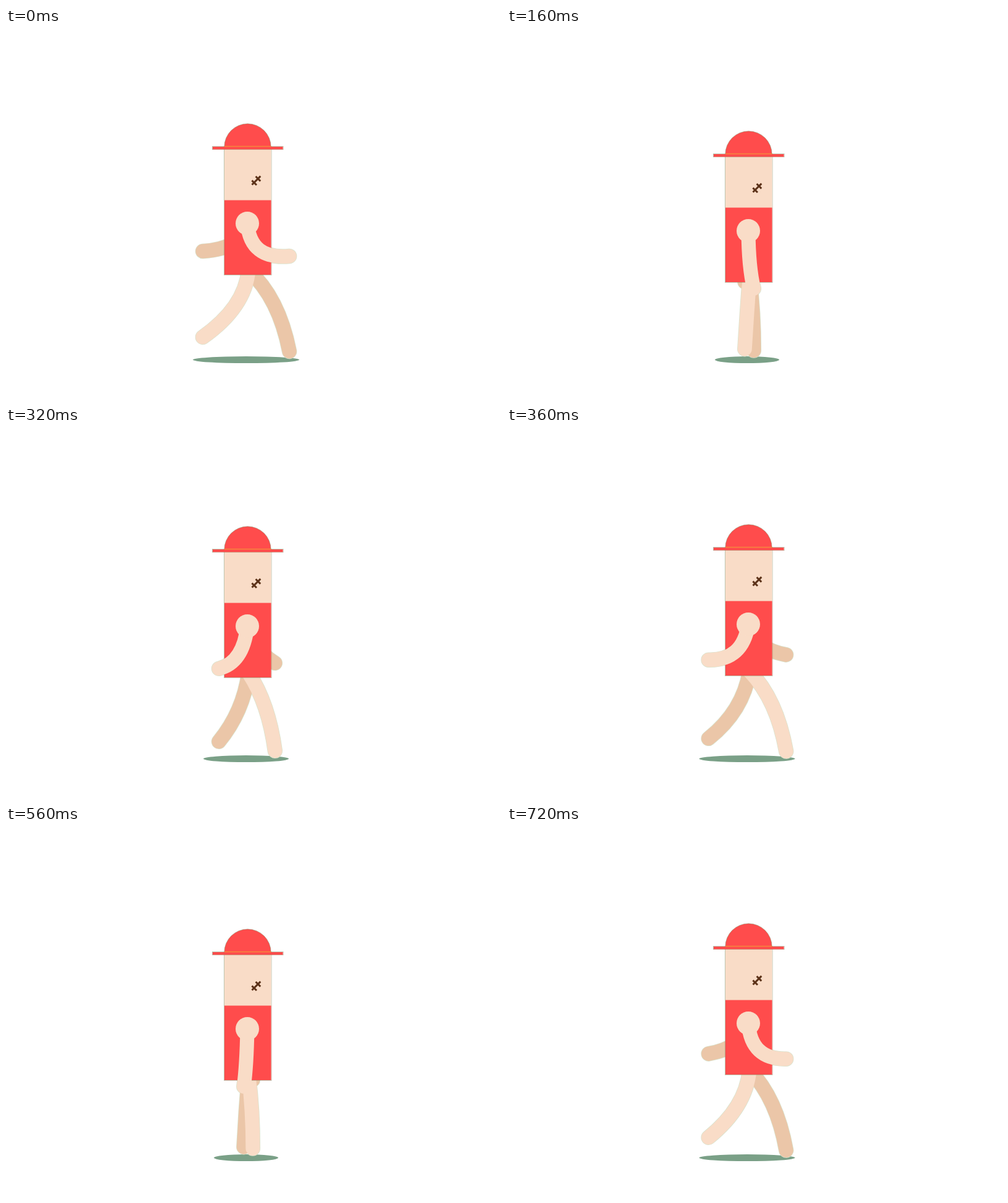
Write an HTML page with a canvas that moves like this. It is 800 px wide and 600 px high and loops after 0.76 s.

```html
<!DOCTYPE html>
<html lang="en">
<head>
<meta charset="utf-8">
<title>Walk cycle</title>
<style>
html, body { margin: 0; width: 100%; height: 100%; overflow: hidden; background: #fff; }
canvas { display: block; width: 800px; height: 600px; }
</style>
</head>
<body>
<canvas id="stage" width="800" height="600"></canvas>
<script>
const ctx = document.getElementById('stage').getContext('2d');
const STEP = 40, COUNT = 19;
const SKIN = '#f9dcc7', SHADE = '#ebc6a8', RED = '#ff4c4c';
const BROWN = '#5c3219', BAND = '#f5873c', GREEN = '#7aa087';
const RIM = 'rgba(125,140,100,.5)', HALO = '#d9e3cd';

// Stride position from 1 (fully forward) to -1 (fully back); the last steps hurry.
function stride(i) {
  const beat = i < 17 ? i : i === 17 ? 17.5 : 19;
  return 2 * Math.abs(beat / 10 - 1) - 1;
}

function ease(p) {
  const a = Math.abs(p);
  return Math.sign(p) * a * a * (3 - 2 * a);
}

function line(color, width, ...pts) {
  ctx.strokeStyle = color;
  ctx.lineWidth = width;
  ctx.beginPath();
  for (let i = 0; i < pts.length; i += 4) {
    ctx.moveTo(pts[i], pts[i + 1]);
    ctx.lineTo(pts[i + 2], pts[i + 3]);
  }
  ctx.stroke();
}

function box(color, x, y, w, h) {
  ctx.fillStyle = color;
  ctx.fillRect(x, y, w, h);
}

function limb(color, width, x, y, cx, cy, ex, ey) {
  ctx.strokeStyle = color;
  ctx.lineWidth = width;
  ctx.lineCap = 'round';
  ctx.beginPath();
  ctx.moveTo(x, y);
  ctx.quadraticCurveTo(cx, cy, ex, ey);
  ctx.stroke();
  ctx.lineCap = 'butt';
}

const reach = e => 392 + e * (e > 0 ? 66 : 74);

// rear: how far the knee trails when the leg swings back
function leg(color, e, rear, width = 23) {
  const fwd = e > 0;
  const cx = fwd ? 394 + 47 * e : 388 + rear * e;
  const cy = fwd ? 450 - 14 * e : 450 - rear * e;
  limb(color, width, 392, 392, cx, cy, reach(e), 508 + e * (fwd ? 15 : 8));
}

function frontArm(color, e, width = 23) {
  const cx = 390 + e * (e > 0 ? 5 : 10);
  limb(color, width, 390, 316, cx, 375, reach(e), 414 - 45 * Math.abs(e));
}

function backArm(color, e, width = 23) {
  const a = Math.abs(e);
  limb(color, width, 390, 316, 390 + 8 * e, 339 + 18 * a, reach(e), 403 - 42 * a);
}

function torso() {
  ctx.strokeStyle = RIM;
  ctx.lineWidth = 1;
  ctx.strokeRect(352.5, 192, 76.5, 207.5);
  box(SKIN, 353, 192, 75.5, 87);
  box(RED, 353, 278.5, 75.5, 120.5);
}

function hat() {
  ctx.fillStyle = RED;
  ctx.strokeStyle = RIM;
  ctx.lineWidth = 1;
  ctx.beginPath();
  ctx.arc(390.5, 192.5, 37.7, Math.PI, 0);
  ctx.fill();
  ctx.stroke();
  ctx.strokeRect(333.5, 191.5, 114.5, 5);
  box(RED, 334, 192, 113.5, 4.3);
  line(BAND, 1.5, 353, 191.4, 428.5, 191.4);
}

function eye() {
  line(BROWN, 3,
    397.5, 253.5, 411.3, 239.6,
    397.4, 246.6, 405, 254,
    403.6, 240, 411.2, 247.6);
}

function draw(i) {
  const p = stride(i), e = ease(p), drop = 1 - Math.abs(p);
  box('#fff', 0, 0, 800, 600);

  ctx.fillStyle = GREEN;
  ctx.beginPath();
  ctx.ellipse(388, 536.6, 86 - 42.5 * drop, 5.5, 0, 0, 2 * Math.PI);
  ctx.fill();

  ctx.save();
  ctx.translate(0, 15 * drop);
  // pale edge around the limbs
  backArm(HALO, -e, 24.5);
  leg(HALO, e, 7, 24.5);
  leg(HALO, -e, 2, 24.5);
  frontArm(HALO, e, 24.5);

  backArm(SHADE, -e);
  leg(SHADE, e, 7);
  leg(SKIN, -e, 2);
  torso();
  hat();
  eye();
  frontArm(SKIN, e);
  ctx.fillStyle = SKIN;
  ctx.beginPath();
  ctx.arc(390, 316, 19, 0, 2 * Math.PI);
  ctx.fill();
  ctx.restore();
}

const start = performance.now();
function tick() {
  const t = Math.max(0, performance.now() - start);
  draw(Math.floor(t / STEP) % COUNT);
  requestAnimationFrame(tick);
}
tick();
</script>
</body>
</html>
```
